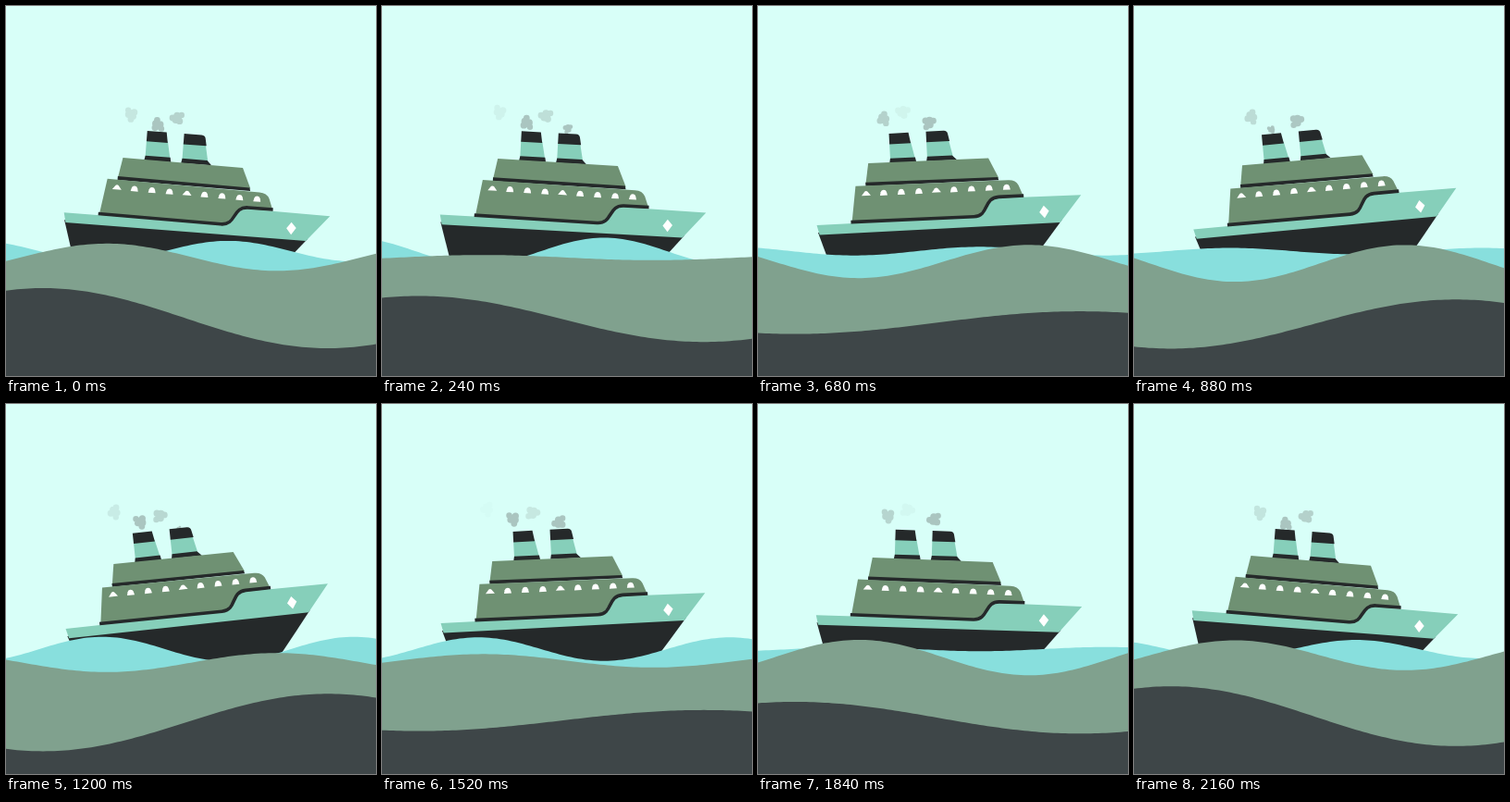
An HTML page with a canvas that plays this animation: 400 px wide and 400 px high, repeating every 2.2 s.

```html
<!DOCTYPE html>
<html>
<head>
<meta charset="utf-8">
<style>
html, body { margin: 0; width: 100%; height: 100%; overflow: hidden; background: #d8fff8; }
canvas { display: block; }
</style>
</head>
<body>
<canvas id="stage" width="400" height="400"></canvas>
<script>
const ctx = document.getElementById('stage').getContext('2d');
const LOOP = 2200, STEP = 40, TURN = 2 * Math.PI;
const DARK = '#25292a', TEAL = '#86cfba', GREEN = '#6f9173';

// Cosine swing over one loop, highest at the given time
const swing = (t, peak = 0) => Math.cos(TURN * (t - peak) / LOOP);
// Cosine ripple along the stage, lowest on screen at the given x
const ripple = (x, center, length) => Math.cos(TURN * (x - center) / length);
const shipAngle = t => (5.4 * swing(t) - 1) * Math.PI / 180;

const backWave = (x, t) => 265 + 14.5 * ripple(x, 240, 272) * swing(t, 1345);
const middleWave = (x, t) =>
  275.5 + (2.4 + 20 * ripple(x, 109, 368)) * swing(t, 840) + 3.2 * swing(t, 1390);
const frontWave = (x, t) => 341 + (3.5 + 32.5 * ripple(x, 40, 616)) * swing(t, 1095);

function fill(color, path) {
  ctx.fillStyle = color;
  ctx.fill(new Path2D(path));
}

function drawWave(color, height, t) {
  ctx.beginPath();
  ctx.moveTo(0, 400);
  for (let x = 0; x <= 400; x += 4) ctx.lineTo(x, height(x, t));
  ctx.lineTo(400, 400);
  ctx.fillStyle = color;
  ctx.fill();
}

function drawPuff(funnelX, age, turn) {
  const rise = Math.min(1, age / 320);
  const x = funnelX - 0.026 * Math.max(0, age - 340);
  const y = 136 - 7.5 * rise - 0.01 * Math.max(0, age - 320);
  const size = 0.4 + 0.6 * rise;
  ctx.beginPath();
  for (let i = 0; i < 7; i++) {
    const a = turn + i * 2.4 + age / 2500;
    const d = i * size;
    const r = (4.4 - i * 0.2) * size;
    const cx = x + d * Math.cos(a), cy = y + d * Math.sin(a);
    ctx.moveTo(cx + r, cy);
    ctx.arc(cx, cy, r, 0, TURN);
  }
  ctx.globalAlpha = 0.44 * Math.min(1, Math.max(0, (1900 - age) / 1150));
  ctx.fillStyle = '#707c79';
  ctx.fill();
  ctx.globalAlpha = 1;
}

// Each funnel lets out two puffs per loop
function drawSmoke(t) {
  const sway = 87 * Math.sin(shipAngle(t));
  for (let i = 0; i < 4; i++) {
    const left = i % 2;
    const birth = (left ? 780 : 80) + (i > 1 ? LOOP / 2 : 0);
    drawPuff((left ? 157 : 196) + sway, (t - birth + LOOP) % LOOP, i * 1.7);
  }
}

function drawWindows() {
  const dome = 'M-4 3L-3.2-.5Q-2.5-3 0-3T3.2-.5L4 3Z';
  const peaked = 'M-5 2.5L-1.5-2Q0-3 1.5-2L5 2.5Z';
  for (let i = 0; i < 9; i++) {
    ctx.save();
    ctx.translate(118 + 19 * i, 200.3 + i * 0.12);
    fill('#fff', i == 0 || i == 4 ? peaked : dome);
    ctx.restore();
  }
}

function drawShip(t) {
  ctx.save();
  ctx.translate(177, 224 - 0.6 * (1 - swing(t)));
  ctx.rotate(shipAngle(t));
  ctx.translate(-177, -224);

  // Funnels
  fill(TEAL, 'M146 147H169L173 166H146Z M186 147H210L214 166H186Z');
  fill(DARK, 'M146 137H167L169 148.5H146Z M186 137H205Q209 137 209.5 141L211 148.5H186Z');
  fill(DARK, 'M146 164H173L174 169H145Z M186 164H213L218 169H185Z');

  // Decks
  fill(GREEN, 'M122 168L252 169L262 191H118Z');
  fill(DARK, 'M118 188.5L261 190L262 193.5L118 192.5Z');
  fill(GREEN, 'M107 192L272 194Q280 194 283 200L288 213L252 214L237 232H101Z');

  // Hull
  fill(DARK, 'M64 240H328L310 262L290 286L79 288Z');
  fill(TEAL, 'M63 232H235C250 232 246 213 261 213L350 214L326 242.5L65.5 242.5Z');
  ctx.strokeStyle = DARK;
  ctx.lineWidth = 3.6;
  ctx.stroke(new Path2D('M100 230.5L233 231.5C250 231.5 244 211.5 261 211.5H288'));

  drawWindows();
  fill('#fff', 'M309 223.5L314.5 229.5L309.5 237L304 230.5Z');
  ctx.restore();
}

const start = performance.now();

function draw() {
  const elapsed = (performance.now() - start) % LOOP;
  const t = Math.floor(elapsed / STEP) * STEP;
  ctx.fillStyle = '#d8fff8';
  ctx.fillRect(0, 0, 400, 400);
  drawSmoke(t);
  drawShip(t);
  drawWave('#88dfdd', backWave, t);
  drawWave('#80a18e', middleWave, t);
  drawWave('#3e4648', frontWave, t);
  requestAnimationFrame(draw);
}
draw();
</script>
</body>
</html>
```
